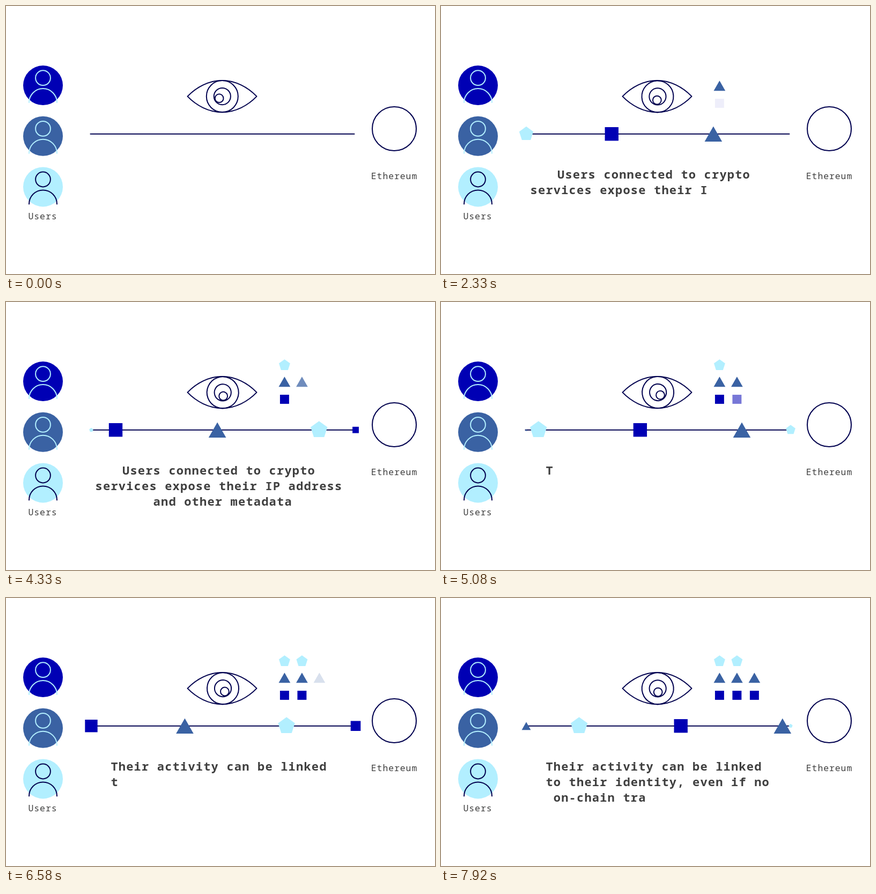
An HTML page that plays this animation: 800 by 500 pixels, repeating every 8 s.

```html
<!DOCTYPE html>
<html lang="en">
<head>
<meta charset="utf-8">
<title>Metadata exposure</title>
<style>
  html, body { margin: 0; width: 100%; height: 100%; overflow: hidden; background: #fff; }
  svg { display: block; width: 800px; height: 500px; }
  text { font-family: "Noto Sans Mono", "DejaVu Sans Mono", monospace; white-space: pre; fill: #3f3f3f; }
  .label { font-size: 16.5px; letter-spacing: .9px; }
  .caption { font-size: 22px; font-weight: 700; letter-spacing: 1.2px; }
  .line { fill: none; stroke: #00004f; stroke-width: 2; stroke-linecap: round; stroke-linejoin: round; }
  .light { stroke: #b2efff; }
</style>
</head>
<body>
<svg id="stage" viewBox="0 0 800 500">
  <g id="users"></g>
  <text class="label" x="41.5" y="398.3">Users</text>

  <g class="line">
    <path d="M338.5 168.6C355 151.5 378 139 403 139S451 151.5 467.5 168.6C451 185.7 428 198.2 403 198.2S355 185.7 338.5 168.6Z"/>
    <g id="iris">
      <circle cx="403.3" cy="168.6" r="29.5"/>
      <circle cx="403.3" cy="168.6" r="15.6"/>
      <circle cx="397.6" cy="172.2" r="7.9"/>
    </g>
    <path d="M157.5 238.7H649.5"/>
    <circle cx="724" cy="229" r="41"/>
  </g>
  <text class="label" x="680.8" y="322.5">Ethereum</text>

  <g id="packets"></g>
  <g id="icons"></g>
  <g id="captions"></g>
</svg>
<script>
const LOOP = 8000, SHOWN_FPS = 12, TICKS_PER_SHOWN = 2.5;
const $ = id => document.getElementById(id);
const clamp = v => Math.max(0, Math.min(1, v));
const smooth = v => { const s = clamp(v); return s * s * (3 - 2 * s); };

function add(parent, tag, attrs) {
  const el = document.createElementNS('http://www.w3.org/2000/svg', tag);
  for (const name in attrs) el.setAttribute(name, attrs[name]);
  return parent.appendChild(el);
}

// Users
[[148.1, '#0000b4', 'line light'], [242.8, '#3a62a3', 'line light'], [337.4, '#b2efff', 'line']]
  .forEach(([y, fill, cls]) => {
    const g = add($('users'), 'g', { transform: `translate(69 ${y})` });
    add(g, 'circle', { r: 37, fill });
    add(g, 'circle', { cy: -13.9, r: 13.9, class: cls });
    add(g, 'path', { d: 'M-26 32A26 26 0 0 1 26 32', class: cls });
  });

// Packets travel along the line; each leaves an icon beside the eye
const pentagon = Array.from({ length: 5 }, (_, i) => {
  const a = i * Math.PI * 0.4;
  return [16.5 * Math.sin(a), -16.5 * Math.cos(a)].map(v => v.toFixed(2));
}).join(' ');
const KINDS = [
  { points: '0 -14.2 16.3 14.3 -16.3 14.3', fill: '#3a62a3', iconY: 148.6 },
  { points: '-12.7 -12.7 12.7 -12.7 12.7 12.7 -12.7 12.7', fill: '#0000b4', iconY: 181.5 },
  { points: pentagon, fill: '#b2efff', iconY: 118 }
];
const FIRST = 24, GAP = 25, GROW = 25, TRAVEL = 65, SHRINK = 30;

const packets = Array.from({ length: 10 }, (_, i) => {
  const { points, fill, iconY } = KINDS[i % 3];
  const iconX = 519.4 + 32.5 * Math.floor(i / 3);
  return {
    start: FIRST + GAP * i,
    body: add($('packets'), 'polygon', { points, fill }),
    icon: add($('icons'), 'polygon', {
      points, fill, transform: `translate(${iconX} ${iconY}) scale(.667)`
    })
  };
});

function drawPacket({ start, body, icon }, tick) {
  const age = tick - start;
  const x = 159 + 493 * clamp(age / TRAVEL);
  const scale = Math.min(clamp(1 + age / GROW), clamp(1 - (age - TRAVEL) / SHRINK));
  body.setAttribute('visibility', scale ? 'visible' : 'hidden');
  body.setAttribute('transform', `translate(${x} 238.7) scale(${scale})`);
  icon.setAttribute('opacity', clamp((age - 20) / 15));
}

// Captions, typed with an eased character count
const CHAR = 14.4, TYPING = 119, CAPTION_TICKS = 150;
const captions = [
  ['Users connected to crypto', 'services expose their IP address', ' and other metadata'],
  ['Their activity can be linked', ' to their identity, even if no', ' on-chain transaction occurs']
].map((lines, i) => ({
  start: i * CAPTION_TICKS,
  total: lines.join('').length,
  rows: lines.map((text, row) => ({
    text,
    el: add($('captions'), 'text', {
      class: 'caption', x: 397 - CHAR * text.length / 2, y: 322.3 + 28.8 * row
    })
  }))
}));

function drawCaption({ start, total, rows }, tick) {
  const age = tick - start;
  const active = age >= 0 && age < CAPTION_TICKS;
  let left = active ? Math.ceil(total * smooth(age / TYPING)) : 0;
  for (const { text, el } of rows) {
    // Leading spaces are kept as no-break spaces
    el.textContent = text.slice(0, Math.max(0, left)).replace(/^ /, '\u00a0');
    left -= text.length;
  }
}

// Eye rotation: [tick, degrees]
const LOOK = [[32, 0], [70, -48], [95, 0], [152, -98], [172, -98], [245, -61]];

function lookAngle(tick) {
  const i = LOOK.findIndex(([t]) => t > tick);
  if (i <= 0) return i ? LOOK[LOOK.length - 1][1] : LOOK[0][1];
  const [t0, a0] = LOOK[i - 1], [t1, a1] = LOOK[i];
  return a0 + (a1 - a0) * smooth((tick - t0) / (t1 - t0));
}

const origin = performance.now();
let last = -1;

function frame() {
  const time = Math.max(0, performance.now() - origin) % LOOP;
  // Small lead so steps land on their rounded display times
  const step = Math.min(95, Math.floor((time + 4) * SHOWN_FPS / 1000));
  if (step !== last) {
    last = step;
    const tick = Math.floor(step * TICKS_PER_SHOWN);
    packets.forEach(p => drawPacket(p, tick));
    captions.forEach(c => drawCaption(c, tick));
    $('iris').setAttribute('transform', `rotate(${lookAngle(tick)} 403.95 168)`);
  }
  requestAnimationFrame(frame);
}
frame();
</script>
</body>
</html>
```
